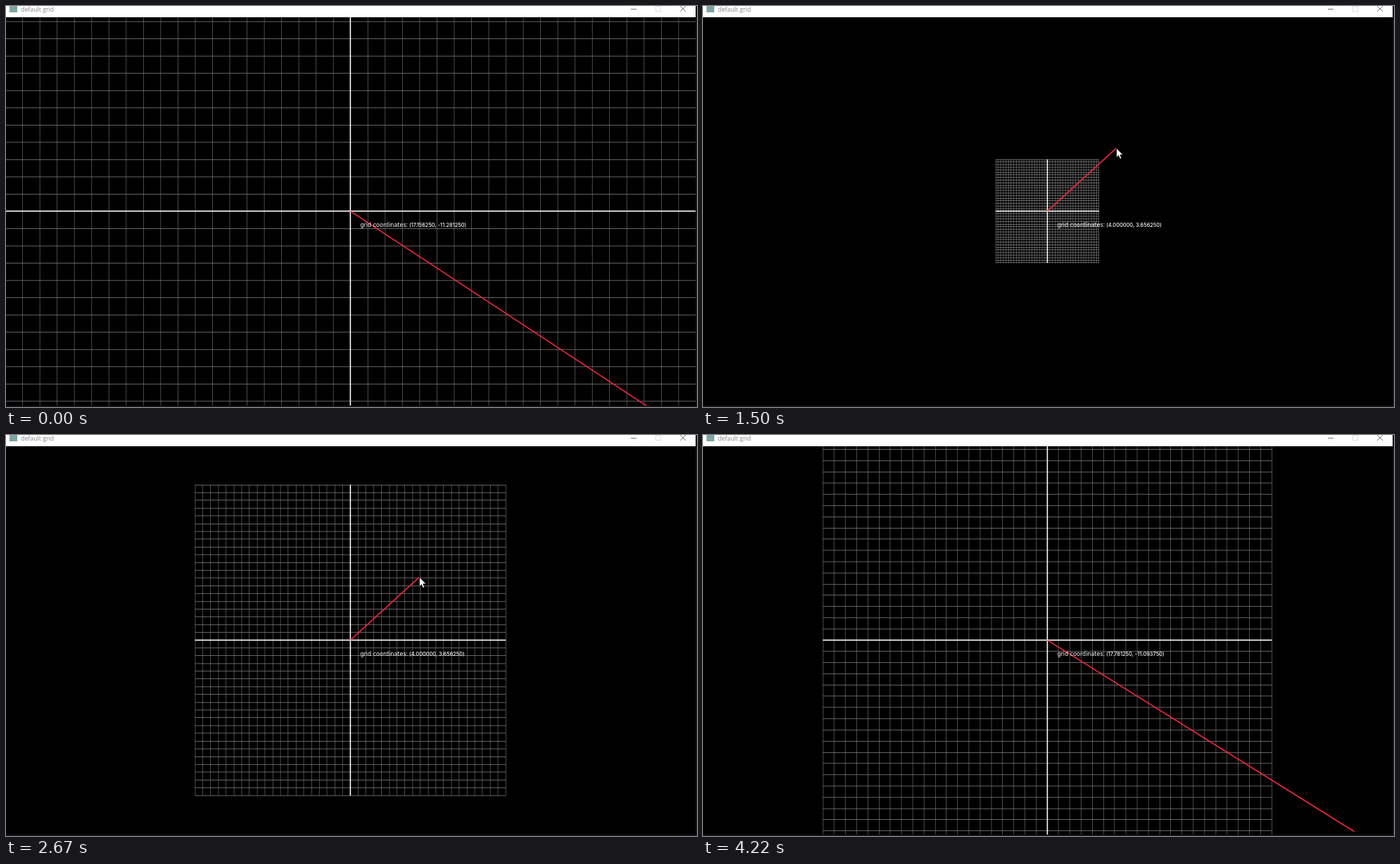
Write an HTML page with a canvas that moves like this. It is 982 px wide and 570 px high and loops after 4670 ms.

```html
<!DOCTYPE html>
<html lang="en">
<head>
<meta charset="utf-8">
<title>default grid</title>
<style>
  html, body { margin: 0; width: 100%; height: 100%; overflow: hidden; background: #000; }
  canvas { display: block; }
</style>
</head>
<body>
<canvas id="stage" width="982" height="570"></canvas>
<script>
const ctx = document.getElementById('stage').getContext('2d');
const LOOP = 4670, TICK = 25;

// The scene is a 1280 x 720 window shown at reduced size
const SCALE = 552 / 720, ORIGIN = { x: -1.3, y: 15.6 };
const CENTER = { x: 640, y: 360 };
const CELL = 32, HALF_CELLS = 20;

const ZOOM_PER_NOTCH = 0.05;
const wheelTurns = [
  { start: 650, end: 730, notches: -5 },
  { start: 1000, end: 1250, notches: -6 },
  { start: 1400, end: 1500, notches: -6 },
  { start: 1870, end: 1980, notches: 5 },
  { start: 2250, end: 2330, notches: 5 },
  { start: 2620, end: 2720, notches: -6 },
  { start: 2990, end: 3060, notches: -5 },
  { start: 3280, end: 3350, notches: 5 },
  { start: 3550, end: 3600, notches: 4 },
  { start: 3800, end: 3830, notches: 2 },
];
const mouseStart = { x: 549, y: -361 };
const mouseMoves = [
  { start: 50, end: 560, x: 123, y: 106 },
  { start: 760, end: 860, x: 128, y: 117 },
  { start: 3850, end: 4220, x: 569, y: -355 },
];

const smooth = p => p * p * (3 - 2 * p);

function progress(t, { start, end }) {
  if (t < start) return 0;
  if (t >= end) return 1;
  return (Math.floor((t - start) / TICK) + 1) * TICK / (end - start + TICK);
}

function zoomAt(t) {
  const notches = wheelTurns.reduce((sum, turn) => sum + Math.round(turn.notches * progress(t, turn)), 0);
  return 1 + notches * ZOOM_PER_NOTCH;
}

function mouseAt(t) {
  return mouseMoves.reduce((from, move) => {
    const p = smooth(Math.min(1, progress(t, move)));
    return {
      x: Math.round(from.x + (move.x - from.x) * p),
      y: Math.round(from.y + (move.y - from.y) * p),
    };
  }, mouseStart);
}

function rect(color, x, y, w, h) {
  ctx.fillStyle = color;
  ctx.fillRect(x, y, w, h);
}

function line(color, width, x1, y1, x2, y2) {
  ctx.strokeStyle = color;
  ctx.lineWidth = width;
  ctx.beginPath();
  ctx.moveTo(x1, y1);
  ctx.lineTo(x2, y2);
  ctx.stroke();
}

function text(content, font, color, x, y) {
  ctx.font = font;
  ctx.fillStyle = color;
  ctx.fillText(content, x, y);
}

function drawTitleBar() {
  rect('#fff', 0, 0, 980, 16);
  rect('#7fa3a3', 5, 0, 11, 9);
  text('default grid', '8.8px "Open Sans", sans-serif', '#858585', 21, 8);
  line('#777', 1, 888, 4.5, 896, 4.5);
  ctx.strokeStyle = '#ddd';
  ctx.strokeRect(923.5, 0.5, 7, 7);
  line('#777', 1, 958, 0, 966, 8);
  line('#777', 1, 966, 0, 958, 8);
}

function drawGrid(zoom) {
  const cell = CELL * zoom, half = cell * HALF_CELLS;
  const left = CENTER.x - half, top = CENTER.y - half, size = 2 * half;
  for (let i = 0; i <= 2 * HALF_CELLS; i++)
    rect('#626262', Math.floor(left + i * cell), top, 1, size);
  for (let i = 0; i <= 2 * HALF_CELLS; i++)
    rect('#828282', left, Math.floor(top + i * cell), size, 1);
  line('#fff', 2, CENTER.x, top, CENTER.x, top + size);
  line('#fff', 2, left, CENTER.y, left + size, CENTER.y);
}

function drawReadout(mouse) {
  const [x, y] = [mouse.x, mouse.y].map(value => (value / CELL).toFixed(6));
  text('grid coordinates:', '8px "DejaVu Sans", sans-serif', '#fff', 503.5, 313.5);
  text(`(${x}, ${y})`, '500 7.4px Inter, sans-serif', '#fff', 573, 313.5);
}

function drawCursor(x, y) {
  const outline = new Path2D('M0 0V13.5L3 10.7L5.2 15.5L7.4 14.5L5.3 9.8H9.5Z');
  ctx.save();
  ctx.translate(x, y);
  ctx.fillStyle = '#fff';
  ctx.fill(outline);
  ctx.strokeStyle = '#000';
  ctx.lineWidth = 0.8;
  ctx.stroke(outline);
  ctx.restore();
}

function draw(t) {
  const mouse = mouseAt(t);
  const tip = { x: CENTER.x + mouse.x, y: CENTER.y - mouse.y };
  rect('#141414', 0, 0, 982, 570);
  drawTitleBar();

  ctx.save();
  ctx.beginPath();
  ctx.rect(0, 16, 980, 552);
  ctx.clip();
  rect('#000', 0, 0, 982, 570);
  ctx.save();
  ctx.transform(SCALE, 0, 0, SCALE, ORIGIN.x, ORIGIN.y);
  drawGrid(zoomAt(t));
  line('#f7283c', 2, CENTER.x, CENTER.y, tip.x, tip.y);
  ctx.restore();
  drawReadout(mouse);
  ctx.restore();

  const cursorInside = t >= 120 && t < 4220;
  if (cursorInside) drawCursor(ORIGIN.x + tip.x * SCALE, ORIGIN.y + tip.y * SCALE);
}

const begin = performance.now();
function tick() {
  draw((performance.now() - begin) % LOOP);
  requestAnimationFrame(tick);
}
tick();
</script>
</body>
</html>
```
